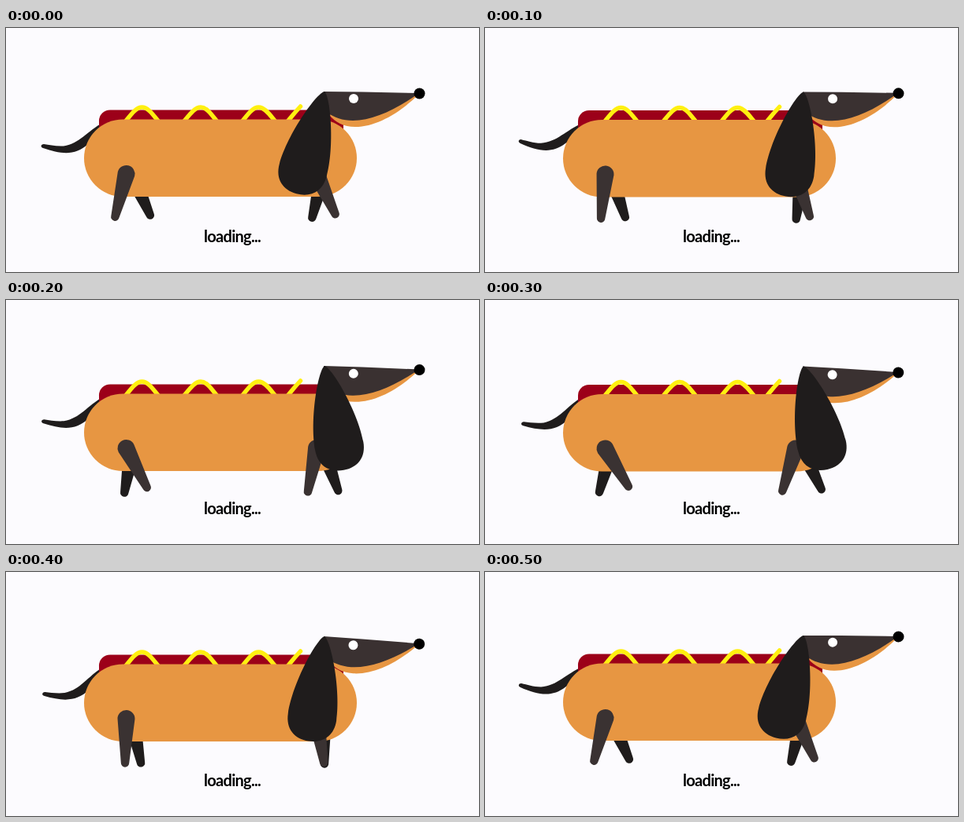
An HTML page for the animation above (600 ms loop, 600 by 311 pixels).

```html
<!DOCTYPE html>
<html lang="en">
<head>
<meta charset="utf-8">
<title>Loading</title>
<style>
html, body { margin: 0; height: 100%; overflow: hidden; background: #fcfbfe; }
svg { display: block; width: 100vw; height: 100vh; }
text { font: 700 20px Lato, "Open Sans", sans-serif; letter-spacing: -.7px; }
</style>
</head>
<body>
<svg viewBox="0 0 600 311">
  <defs>
    <path id="leg" d="M-11 0A11 11 0 0 1 11 0L5.2 56.5A5.2 5.2 0 0 1 -5.2 56.5Z"/>
  </defs>
  <g id="dog">
    <path id="tail" fill="#1f1c1c" d="M124 120C102 132 94 147 73 150.500C63 151 55 149 48 148C44 148 43.500 152 47 153C70 161 88 163 104 148L124 132Z"/>
    <g fill="#1f1c1c">
      <g transform="translate(160 187)"><use id="backFar" href="#leg"/></g>
      <g transform="translate(402 187)"><use id="frontFar" href="#leg"/></g>
    </g>
    <rect x="118" y="104.500" width="310" height="40" rx="14" fill="#9c0019"/>
    <path fill="none" stroke="#fff010" stroke-width="5.500" stroke-linecap="round"
      d="M135.500 131C149 131 159 101 172.500 101S196 131 209.500 131S233.500 101 247 101S270 131 283.500 131S307 101 320.500 101S344 131 353 124Q359 117 363 112T373.500 100"/>
    <rect x="99" y="116.500" width="346" height="98.500" rx="49.250" fill="#e79642"/>
    <g fill="#3a3232">
      <g transform="translate(152.500 186)"><use id="backNear" href="#leg"/></g>
      <g transform="translate(394 186)"><use id="frontNear" href="#leg"/></g>
    </g>
    <g id="head">
      <path fill="#e79642" d="M524 84C500 108 470 126 443 126C428 126 418 120 410 111L430 100Z"/>
      <path fill="#3a3131" d="M403 81L452 81.500L524 83C495 104 465 118 440 118C427 118 416 114 408 108Z"/>
      <circle cx="441" cy="90" r="6" fill="#fff"/>
      <circle cx="524.500" cy="83.500" r="7"/>
    </g>
    <g transform="translate(404 81)">
      <path id="ear" fill="#1f1c1c" d="M0 0C9 4 31 64 31 104C31 124 18 135 0 135S-31 124 -31 104C-31 64 -9 4 0 0Z"/>
    </g>
  </g>
  <text x="251" y="273">loading...</text>
</svg>
<script>
const STEP = 100;
const bob = [0, .5, 3, 3.5, 1, 0];

// part: [pivot x, pivot y, angle in degrees at each step of the walk]
const joints = {
  tail: [120, 125, [0, 5, -1, -3, -3.2, 4.7]],
  head: [403, 82, [0, -.3, 1.2, 2.6, 3.4, -.5]],
  ear: [0, 0, [15.2, 9.6, -10.4, -13, 8.6, 15]],
  backNear: [0, 0, [14.5, 5.5, -27.7, -31.4, 1.5, 14.5]],
  backFar: [0, 0, [-23.9, -18.4, 10, 15.4, -11.3, -23.9]],
  frontNear: [0, 0, [-24.8, -18.4, 11.3, 17.3, -9.3, -24.8]],
  frontFar: [0, 0, [14, 7.4, -20, -26, -2, 14]]
};

const move = (id, value) => document.getElementById(id).setAttribute("transform", value);

function draw(now) {
  const step = Math.floor(now / STEP) % bob.length;
  move("dog", `translate(0 ${bob[step]})`);
  for (const [id, [x, y, angles]] of Object.entries(joints)) {
    move(id, `rotate(${angles[step]} ${x} ${y})`);
  }
}

const start = performance.now();
function tick() {
  draw(performance.now() - start);
  requestAnimationFrame(tick);
}
tick();
</script>
</body>
</html>
```
